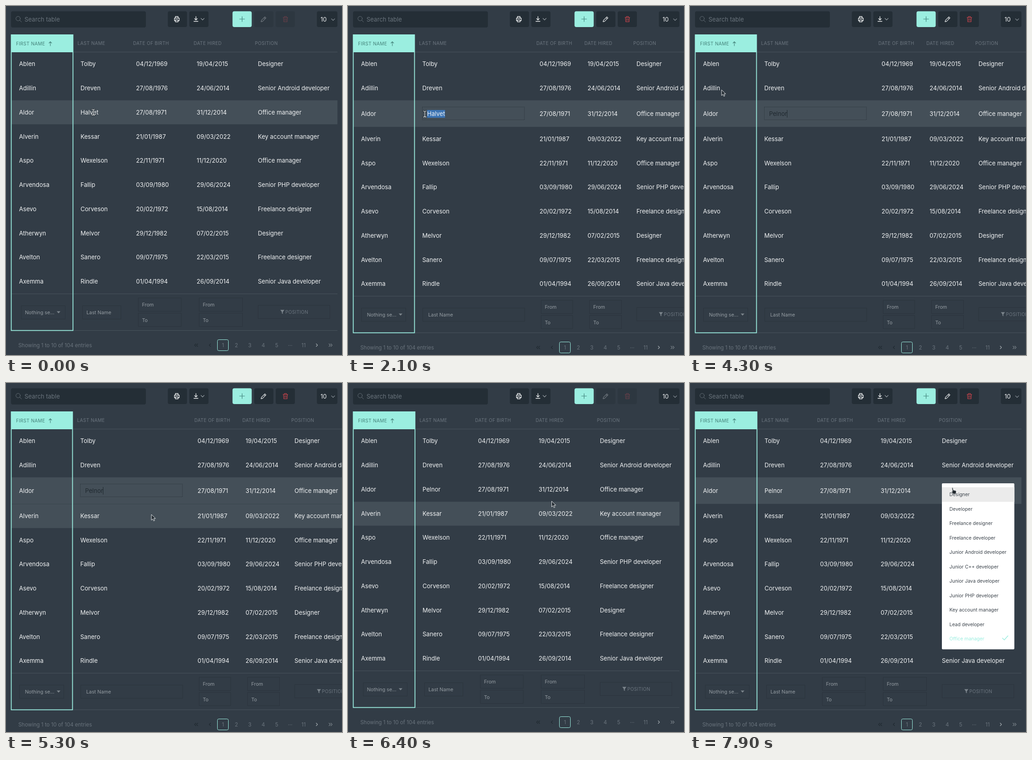
An HTML page that plays this animation: 735 px wide and 762 px high, repeating every 8 s.

```html
<!DOCTYPE html>
<html lang="en">
<head>
<meta charset="utf-8">
<title>Editable staff table</title>
<style>
  html, body { margin: 0; width: 100%; height: 100%; overflow: hidden; background: #323c46; }
  svg { display: block; width: 735px; height: 762px; font-family: Inter, sans-serif; }
  text { fill: #f1f3f4; white-space: pre; }
  .muted { fill: #69737c; }
  .head { letter-spacing: .35px; fill: #6d7780; }
  .sorted { fill: #438078; }
  .filter { fill: #959da3; }
  .foot { fill: #69737c; }
  .mid { text-anchor: middle; }
  .item { fill: #3c444c; }
  .dark { fill: #242e36; }
  .mint { fill: #9beee0; }
  .line { fill: none; stroke: #48535c; }
  .field { fill: none; stroke: #28323a; stroke-opacity: .75; }
  .icon { fill: none; stroke: #f1f3f4; stroke-width: 1.3; stroke-linecap: round; stroke-linejoin: round; }
  .hover { fill: #444f58; }
  .selection { fill: #3c74b4; }
</style>
</head>
<body>
<svg id="stage" viewBox="0 0 735 762"></svg>
<script>
const LOOP = 8000, TOP = 100.5, ROW = 52.75, EXTRA = 5.2;
const OLD_NAME = 'Halvet', NEW_NAME = 'Pelnor';
const people = [
  ['Ablen', 'Tolby', '04/12/1969', '19/04/2015', 'Designer'],
  ['Adillin', 'Dreven', '27/08/1976', '24/06/2014', 'Senior Android developer'],
  ['Aldor', OLD_NAME, '27/08/1971', '31/12/2014', 'Office manager'],
  ['Alverin', 'Kessar', '21/01/1987', '09/03/2022', 'Key account manager'],
  ['Aspo', 'Wexelson', '22/11/1971', '11/12/2020', 'Office manager'],
  ['Arvendosa', 'Fallip', '03/09/1980', '29/06/2024', 'Senior PHP developer'],
  ['Asevo', 'Corveson', '20/02/1972', '15/08/2014', 'Freelance designer'],
  ['Atherwyn', 'Melvor', '29/12/1982', '07/02/2015', 'Designer'],
  ['Avelton', 'Sanero', '09/07/1975', '22/03/2015', 'Freelance designer'],
  ['Axemma', 'Rindle', '01/04/1994', '26/09/2014', 'Senior Java developer']
];
const jobs = ['Designer', 'Developer', 'Freelance designer', 'Freelance developer',
  'Junior Android developer', 'Junior C++ developer', 'Junior Java developer',
  'Junior PHP developer', 'Key account manager', 'Lead developer', 'Office manager'];
const titles = ['FIRST NAME', 'LAST NAME', 'DATE OF BIRTH', 'DATE HIRED', 'POSITION'];

// Each filter is [left, right]
const normal = { heads: [22, 156.5, 278, 410.5, 544.5], cells: [28.5, 163, 284.5, 417, 551],
  filters: [[33, 129], [167, 251], [289, 383], [422, 517], [551, 708]], edge: 147, right: 725 };
const wide = { heads: [22, 155.5, 412, 517, 624], cells: [28.5, 162.5, 419, 524, 631],
  filters: [[29, 126], [163, 386], [422, 491], [528, 598], [631, 788]], edge: 146, right: 735 };

const stage = document.getElementById('stage');
const pen = document.createElement('canvas').getContext('2d');
pen.font = '100px Inter, sans-serif';
const measure = s => pen.measureText(s).width / 100;
const bodySize = 157 / measure('Senior Android developer');
const scale = { head: .765, filter: .825, foot: .88, item: .8 };

// Centres a line on y, with its baseline on a whole pixel
function text(x, y, s, cls = '', more = '') {
  const size = bodySize * (scale[cls.split(' ')[0]] || 1);
  return `<text x="${x}" y="${Math.round(y + .36 * size)}" font-size="${size}" class="${cls}" ${more}>${s}</text>`;
}
const box = (x, y, w, h, cls, more = '') =>
  `<rect x="${x}" y="${y}" width="${w}" height="${h}" class="${cls}" ${more}/>`;
const path = (d, cls = 'icon', more = '') => `<path d="${d}" class="${cls}" ${more}/>`;
const button = (x, w, cls = 'dark') => box(x, 11.5, w, 34.5, cls, 'rx="4"');

function toolbar() {
  return box(11, 11.5, 295, 35.5, 'dark', 'rx="4"') +
    '<circle cx="26.5" cy="27.5" r="4.8" class="icon" style="stroke:#626c74;stroke-width:1"/>' +
    path('M30 31l4 4', 'icon', 'style="stroke:#626c74;stroke-width:1"') +
    text(40.5, 29.5, 'Search table', 'muted') +
    button(354, 42) +
    path('M370.5 26.5v-3.5h6v3.5M370.5 32h-2v-5.5h10.5v5.5h-2M370.5 30.5h6v4h-6z') +
    button(401, 42) +
    path('M415.5 23v7M412.5 27.5l3 3 3-3M411 33.5h9') +
    path('M426.5 27l3.5 3.5 3.5-3.5', 'icon', 'style="stroke:#8d959b"') +
    button(495.5, 42, 'mint') +
    path('M511 28.5h11M516.5 23v11', 'icon', 'style="stroke:#43857d;stroke-width:1.2"') +
    '<g id="tools">' + button(543, 42) +
    path('M558 34.5l.8-3.3 7.5-7.5 2.4 2.4-7.5 7.5zM564.5 25.5l2.4 2.4', 'icon', 'style="stroke-width:1.1"') +
    button(590, 42) +
    path('M606 25h10.5M609 25v-2h4.5v2M607 25l.7 9.5h7.2l.7-9.5M609.8 27.5v4.5M612.8 27.5v4.5',
      'icon', 'style="stroke:#d0454d;stroke-width:1.1"') + '</g>' +
    button(680, 45) + text(688, 29.5, '10') +
    path('M712 28l3.5 3.5 3.5-3.5', 'icon', 'style="stroke:#7d868d"');
}

function filters({ filters: f }, y) {
  const field = ([l, r], top, h = 29) => box(l + .5, y + top, r - l, h, 'field');
  const range = f => field(f, 9) + field(f, 42) +
    text(f[0] + 8.5, y + 24, 'From', 'filter') + text(f[0] + 8.5, y + 57.5, 'To', 'filter');
  const mid = (f[4][0] + f[4][1]) / 2;
  return field(f[0], 26) + text(41.5, y + 41, 'Nothing se...', 'filter') +
    path(`M111 ${y + 38}h8l-4 4.5z`, '', 'fill="#7d868d"') +
    field(f[1], 26) + text(f === wide.filters ? 175.5 : 176, y + 40.5, 'Last Name', 'filter') +
    range(f[2]) + range(f[3]) + field(f[4], 25) +
    path(`M${mid - 29.5} ${y + 35}h9l-3.5 4.5v4.5l-2-1.5v-3z`, '', 'fill="#7d868d"') +
    text(mid - 18.5, y + 39.5, 'POSITION', 'head');
}

function pager(y) {
  const arrows = (x, dir, n, colour) => Array.from({ length: n }, (_, i) =>
    path(`M${x + i * 4 - (n - 1) * 2 - dir * 1.5} ${y - 3}l${dir * 3} 3l${-dir * 3} 3`, 'icon',
      `style="stroke:${colour};stroke-width:1.1"`)).join('');
  const pages = ['2', '3', '4', '5', '···', '11'];
  return text(27, y, 'Showing 1 to 10 of 104 entries', 'foot') +
    arrows(416, -1, 2, '#202930') + arrows(446, -1, 1, '#202930') +
    box(462.5, y - 12, 24, 24, 'line', 'rx="3" style="stroke:#9beee0"') +
    text(474.5, y, '1', 'foot mid') +
    pages.map((p, i) => text(504 + i * 29.4, y, p, 'foot mid')).join('') +
    arrows(680, 1, 1, '#a5adb2') + arrows(710, 1, 2, '#7b848b');
}

function table(id, cols, extra) {
  const end = Math.floor(TOP + ROW * 10 + extra) + .5, bottom = end + 80;
  const rowY = i => TOP + ROW * i + 26.2 + (i === 2 ? extra / 2 : i > 2 ? extra : 0);
  const skip = { edit: 1, pick: 4 }[id];
  const cells = people.map((p, i) => p.map((s, c) => i === 2 && c === skip ? ''
    : text(cols.cells[c], rowY(i), s, i === 2 && c === 1 ? 'surname' : '')).join('')).join('');
  return `<g id="${id}">` +
    path(`M11 100.5H${cols.right}M11 ${end}H${cols.right}M11 ${bottom}H${cols.right}`, 'line') +
    box(11, 62, cols.edge - 11, 39, 'mint') +
    titles.map((s, c) => text(cols.heads[c], c ? 81.5 : 82, s, c ? 'head' : 'head sorted')).join('') +
    path('M97 87v-9M94 81l3-3 3 3', 'icon', 'style="stroke:#438078;stroke-width:1.1"') +
    cells + filters(cols, end) +
    box(11.5, 63, cols.edge - 12, bottom - 63, '', 'fill="none" stroke="#9beee0" stroke-width="1.8"') +
    pager(bottom + 32) + '</g>';
}

function menu() {
  return '<g id="menu">' + box(551, 219, 158.5, 362.5, '', 'rx="2" fill="#fff"') +
    box(551, 227.5, 158.5, 32, '', 'fill="#ebebeb"') +
    jobs.map((s, i) => text(567.5, 243.7 + i * 31.5, s, i === 10 ? 'item mint' : 'item')).join('') +
    path('M683.5 557l4 4 8-9', 'icon', 'style="stroke:#9beee0;stroke-width:1.5"') + '</g>';
}

const beam = 'M-3.5-6.5q3 0 3.5 1.5q.5-1.5 3.5-1.5M0-5V5M-3.5 6.5q3 0 3.5-1.5q.5 1.5 3.5 1.5';
stage.innerHTML = toolbar() +
  box(11, 0, 714, ROW, 'hover', 'id="hover"') + box(11, TOP + ROW * 2, 714, ROW, 'hover', 'id="active"') +
  box(163, 220, 0, 24, 'selection', 'id="selection"') +
  table('view', normal, 0) + table('edit', wide, EXTRA) + table('pick', normal, EXTRA) +
  '<g id="input">' + box(162.5, 220.5, 223.5, 28, 'field', 'id="frame" stroke-dasharray="2 1"') +
  text(173, 235.3, '', '', 'id="typed"') +
  path('M0 227v16.5', '', 'id="caret" stroke="#1f282f"') + '</g>' + menu() +
  '<g id="cursor"><g id="beam">' +
  path(beam, 'icon', 'style="stroke:#1f272e;stroke-width:3"') + path(beam, 'icon', 'style="stroke-width:1.2"') + '</g>' +
  path('M0 0v12.5l3-2.7 2 4.4 2.2-1-2-4.3h4z', '', 'id="arrow" fill="#252d34" stroke="#e3e6e8"') +
  path('M0 0q1.5-1 2 .5l1 4.5 5 1q1.5.5 1.2 2.5l-.7 4.5H2.5L-.5 8.5q0-1.5 2-.5z', '',
    'id="hand" fill="#20272d" stroke="#e3e6e8" stroke-width=".6"') + '</g>';

const el = Object.fromEntries([...stage.querySelectorAll('[id]')].map(n => [n.id, n]));
const surnames = stage.querySelectorAll('.surname');
const show = (node, on) => { node.style.display = on ? '' : 'none'; };
const set = (node, attrs) => { for (const k in attrs) node.setAttribute(k, attrs[k]); };
const ramp = (t, a, b) => Math.min(1, Math.max(0, (t - a) / (b - a)));
const within = (t, a, b) => t >= a && t < b;

// Pointer stops: time, x, y
const route = [[0, 191, 232], [1200, 191, 232], [1500, 236, 236], [1600, 236, 236], [1900, 168, 236],
  [4200, 168, 236], [4300, 69, 183], [4500, 95, 420], [4700, 170, 600], [4900, 290, 470],
  [5200, 318, 287], [6000, 318, 287], [6800, 573, 229], [LOOP, 573, 229]];
function pointer(t) {
  const i = Math.max(1, route.findIndex(p => p[0] >= t));
  const [t0, x0, y0] = route[i - 1], [t1, x1, y1] = route[i], k = ramp(t, t0, t1);
  return [x0 + (x1 - x0) * k, y0 + (y1 - y0) * k];
}

const keyTimes = [3000, 3300, 3500, 3700, 3700, 3800];

function render(t) {
  const editing = within(t, 500, 5600), picking = t >= 7700, extra = editing || picking ? EXTRA : 0;
  show(el.view, !extra);
  show(el.edit, editing);
  show(el.pick, picking);
  show(el.menu, picking);
  show(el.input, editing);
  el.tools.style.opacity = .35 + .65 * (ramp(t, 400, 700) - ramp(t, 5500, 5700) + ramp(t, 7600, 7900));

  // The hovered row trails the pointer slightly
  const [x, y] = pointer(t);
  const width = editing ? 724 : 714;
  const tail = pointer(Math.max(0, t - 100))[1] - TOP;
  const row = tail < ROW * 3 + extra ? Math.min(2, Math.floor(tail / ROW)) : Math.floor((tail - extra) / ROW);
  show(el.active, extra);
  set(el.active, { height: ROW + extra, width });
  show(el.hover, !(extra && row === 2) && !within(t, 5600, 5800));
  set(el.hover, { y: TOP + ROW * row + (row > 2 ? extra + .5 : 0), width, height: ROW - .5 });

  surnames.forEach(n => { n.textContent = t < 5600 ? OLD_NAME : NEW_NAME; });
  const typed = t < 3000 ? OLD_NAME : NEW_NAME.slice(0, keyTimes.filter(k => k <= t).length);
  el.typed.textContent = typed;
  el.typed.style.fill = within(t, 1800, 3000) ? '#f1f3f4' : '#1f282f';
  el.frame.style.opacity = .4 + .6 * ramp(t, 800, 1000);
  const typedEnd = 173 + measure(typed) * bodySize;
  show(el.caret, t >= 3000);
  el.caret.setAttribute('transform', `translate(${Math.floor(typedEnd) + .5})`);

  const word = within(t, 100, 500), drag = within(t, 1700, 3000), office = within(t, 7300, 7700);
  show(el.selection, word || drag || office);
  const left = word ? 163 : office ? 551 : Math.min(typedEnd, Math.max(173, x));
  const right = word ? 163 + measure(OLD_NAME) * bodySize : office ? 551 + measure('Office') * bodySize : typedEnd;
  set(el.selection, { x: left, width: right - left, y: drag ? 227 : 220, height: drag ? 17 : 24.5 });

  const arrow = within(t, 4300, 6700);
  show(el.arrow, arrow);
  show(el.hand, picking);
  show(el.beam, !arrow && !picking);
  el.cursor.setAttribute('transform', `translate(${x} ${y})`);
}

const start = performance.now();
function tick() {
  render(Math.floor((performance.now() - start) % LOOP / 100) * 100);
  requestAnimationFrame(tick);
}
tick();
</script>
</body>
</html>
```
